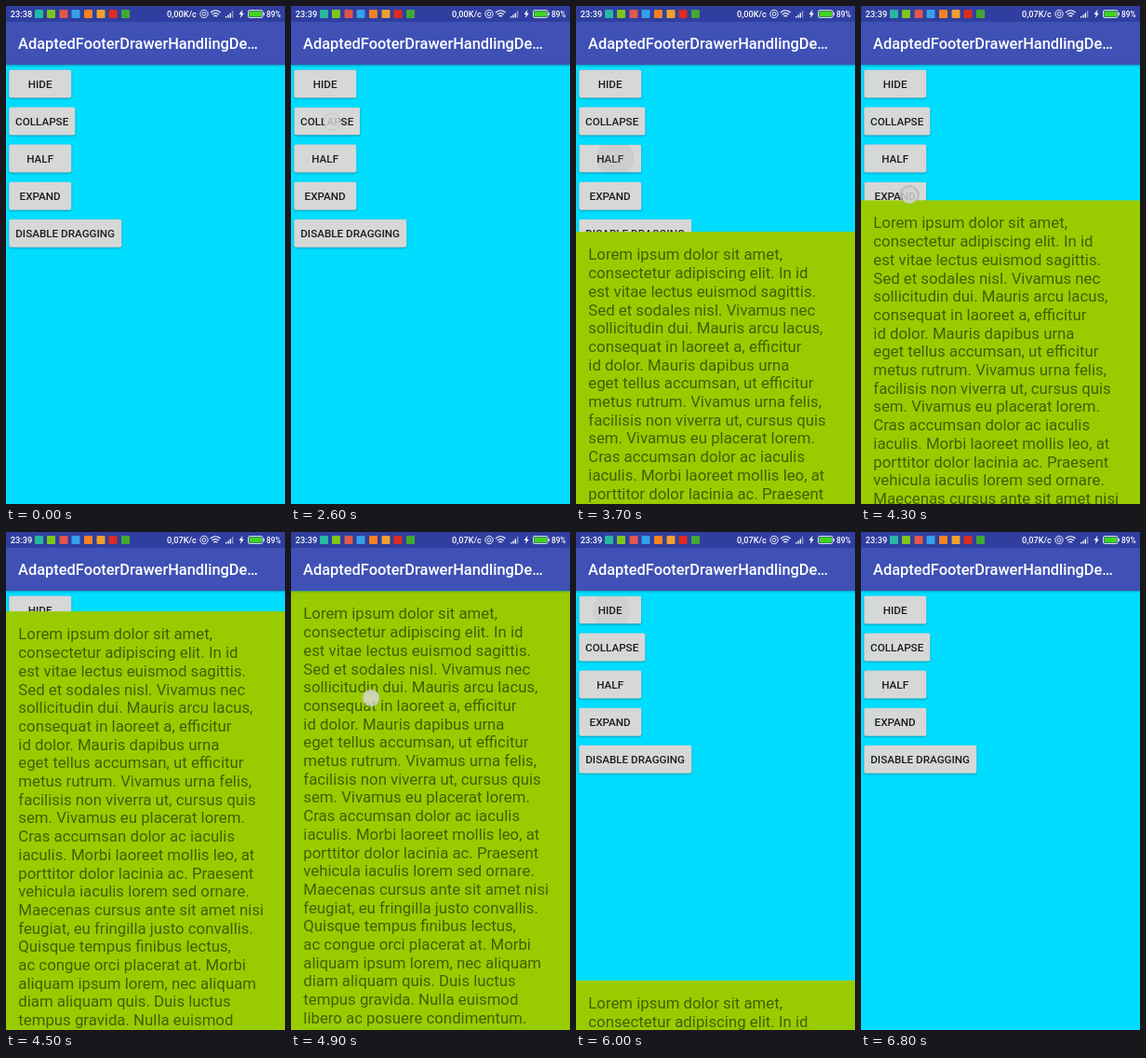
Recreate the animation shown at these times as an HTML page. Size 300 by 534 pixels, loop 6.9 s.

```html
<!DOCTYPE html>
<html lang="en">
<head>
<meta charset="utf-8">
<title>Sliding panel</title>
<style>
html, body { margin: 0; width: 100%; height: 100%; overflow: hidden; background: #00ddff; }
body { position: relative; font-family: Roboto, "Open Sans", sans-serif; }
div, svg { position: absolute; }
#status { left: 0; top: 0; width: 300px; height: 17px; }
#bar {
  left: 0; top: 0; width: 100%; height: 63.4px;
  background: linear-gradient(#303f9f 17px, #3f51b5 17px);
  box-shadow: 0 1px 2px rgba(0, 0, 0, .28);
}
#title {
  left: 13px; top: 29px; line-height: 24px; white-space: nowrap;
  font-size: 16.4px; font-weight: 500; color: #fff;
}
.btn {
  left: 0; top: 0; height: 30px; line-height: 31px; text-align: center;
  background-color: #d6d7d7; border-radius: 2px; box-shadow: 0 1px 2px rgba(0, 0, 0, .3);
  font-size: 11.67px; font-weight: 500; color: rgba(0, 0, 0, .87); white-space: nowrap;
}
#sheet {
  left: 0; top: 0; width: 100%; height: 472px; overflow: hidden;
  box-sizing: border-box; padding: 15.4px 0 0 13.3px;
  background: #99cc00; color: rgba(0, 0, 0, .54);
  font-size: 16.8px; line-height: 19.7px; white-space: pre;
}
#finger {
  left: -10px; top: -10px; width: 20px; height: 20px; border-radius: 50%;
  background: radial-gradient(circle, rgba(218, 218, 218, .8) 55%, rgba(190, 190, 190, .7) 62%, rgba(190, 190, 190, 0) 72%);
}
</style>
</head>
<body>
<div id="buttons"></div>
<div id="sheet">Lorem ipsum dolor sit amet,
consectetur adipiscing elit. In id
est vitae lectus euismod sagittis.
Sed et sodales nisl. Vivamus nec
sollicitudin dui. Mauris arcu lacus,
consequat in laoreet a, efficitur
id dolor. Mauris dapibus urna
eget tellus accumsan, ut efficitur
metus rutrum. Vivamus urna felis,
facilisis non viverra ut, cursus quis
sem. Vivamus eu placerat lorem.
Cras accumsan dolor ac iaculis
iaculis. Morbi laoreet mollis leo, at
porttitor dolor lacinia ac. Praesent
vehicula iaculis lorem sed ornare.
Maecenas cursus ante sit amet nisi
feugiat, eu fringilla justo convallis.
Quisque tempus finibus lectus,
ac congue orci placerat at. Morbi
aliquam ipsum lorem, nec aliquam
diam aliquam quis. Duis luctus
tempus gravida. Nulla euismod
libero ac posuere condimentum.</div>
<div id="bar">
  <svg id="status" viewBox="0 0 300 17" fill="#fff" font-family="Roboto, sans-serif" font-size="9.2" font-weight="500">
    <text id="clock" x="4.8" y="11.800"></text>
    <g id="apps"></g>
    <text id="speed" x="173" y="11.800"></text>
    <g fill="none" stroke="#fff">
      <circle cx="213" cy="8.500" r="4.200" stroke-width=".9"/>
      <circle cx="213" cy="8.500" r="1.900" stroke-width=".9"/>
      <path d="M220 7q5.300-4.500 10.600 0M221.800 9.200q3.500-3 7 0M223.500 11.200q1.800-1.500 3.600 0" stroke-width="1.2"/>
      <rect x="260.500" y="4.500" width="15.500" height="8" rx="1.500" stroke-width=".8"/>
    </g>
    <path d="M236 11h1.400v1.500h-1.400zM238.300 9.500h1.400v3h-1.400zM240.600 7.500h1.400v5h-1.400z"/>
    <path d="M242.900 5h1.400v7.500h-1.400z" opacity=".45"/>
    <path d="M254.500 3.800l-4 5.200h2.300l-1 4 4-5.300h-2.300z"/>
    <rect x="261.500" y="5.500" width="13.500" height="6" rx=".6" fill="#3fd420"/>
    <rect x="276.600" y="7" width="1.200" height="3"/>
    <text x="280" y="11.800" font-size="8.300">89%</text>
  </svg>
  <div id="title">AdaptedFooterDrawerHandlingDe…</div>
</div>
<div id="finger"></div>
<script>
const LOOP = 6900, STEP = 100;
const HIDDEN = 536, PEEK = 451, HALF = 208.4, FULL = 63.4;
const $ = id => document.getElementById(id);
const clamp = v => Math.max(0, Math.min(1, v));
const settle = p => 1 - (1 - p) ** 5;
const smooth = p => p * p * (3 - 2 * p);

const LEFT = 3.3;
const buttons = [
  ['HIDE', 66.7], ['COLLAPSE', 70.7], ['HALF', 66.7],
  ['EXPAND', 66.7], ['DISABLE DRAGGING', 120.7]
].map(([label, width], i) => {
  const el = document.createElement('div');
  const top = 68.5 + 40.05 * i;
  el.className = 'btn';
  el.textContent = label;
  el.style.width = width + 'px';
  el.style.transform = `translate(${LEFT}px, ${top}px)`;
  $('buttons').append(el);
  return { el, top };
});

// status bar tiles: centre, colour
$('apps').innerHTML = [
  [35.5, '#26b9a0'], [48.5, '#7cc61c'], [62, '#e2574c'], [75, '#38a0e8'],
  [88.5, '#f58220'], [102, '#f0a030'], [115, '#dd2c20'], [128.5, '#43a832']
].map(([x, c]) => `<rect x="${x - 4.5}" y="4" width="9" height="9" rx="1" fill="${c}"/>`).join('');

// sheet moves: start, duration, from, to, easing
const moves = [
  [2775, 380, HIDDEN, PEEK, settle],
  [3576, 380, PEEK, HALF, settle],
  [4380, 380, HALF, FULL, settle],
  [4900, 350, FULL, HALF, smooth],
  [5880, 400, HALF, HIDDEN, settle]
];

// touches: down, up, x, y, button index (-1 drags the sheet)
const touches = [
  [2600, 2700, 44, 124, 1],
  [3400, 3550, 42, 163, 2],
  [4200, 4300, 52, 203, 3],
  [4800, 5200, 86, 178, -1],
  [5700, 5800, 38, 84, 0]
];

function sheetTop(t) {
  let y = HIDDEN;
  for (const [start, span, from, to, ease] of moves)
    if (t >= start) y = from + (to - from) * ease(clamp((t - start) / span));
  return y;
}

function draw(t) {
  const top = sheetTop(t);
  $('sheet').style.transform = `translateY(${top}px)`;
  $('clock').textContent = t < 2600 ? '23:38' : '23:39';
  $('speed').textContent = t < 4000 ? '0,00K/c' : '0,07K/c';

  const finger = $('finger').style;
  finger.opacity = 0;
  buttons.forEach(b => b.el.style.backgroundImage = 'none');
  for (const [down, up, x, y, index] of touches) {
    if (t < down || t > up + 300) continue;
    const drag = index < 0 ? top - FULL : 0;
    finger.opacity = 1 - clamp((t - up) / 180);
    finger.transform = `translate(${x}px, ${y + drag}px)`;
    if (index < 0) continue;
    const { el, top: edge } = buttons[index];
    const r = 6 + (t - down) / 22;
    const ink = `rgba(0, 0, 0, ${0.1 * (1 - clamp((t - up) / 300))})`;
    el.style.backgroundImage =
      `radial-gradient(circle at ${x - LEFT}px ${y - edge}px, ${ink} ${r}px, transparent ${r + 1}px)`;
  }
}

const begin = performance.now();
function tick() {
  const t = (performance.now() - begin) % LOOP;
  draw(Math.floor(t / STEP) * STEP);
  requestAnimationFrame(tick);
}
tick();
</script>
</body>
</html>
```
